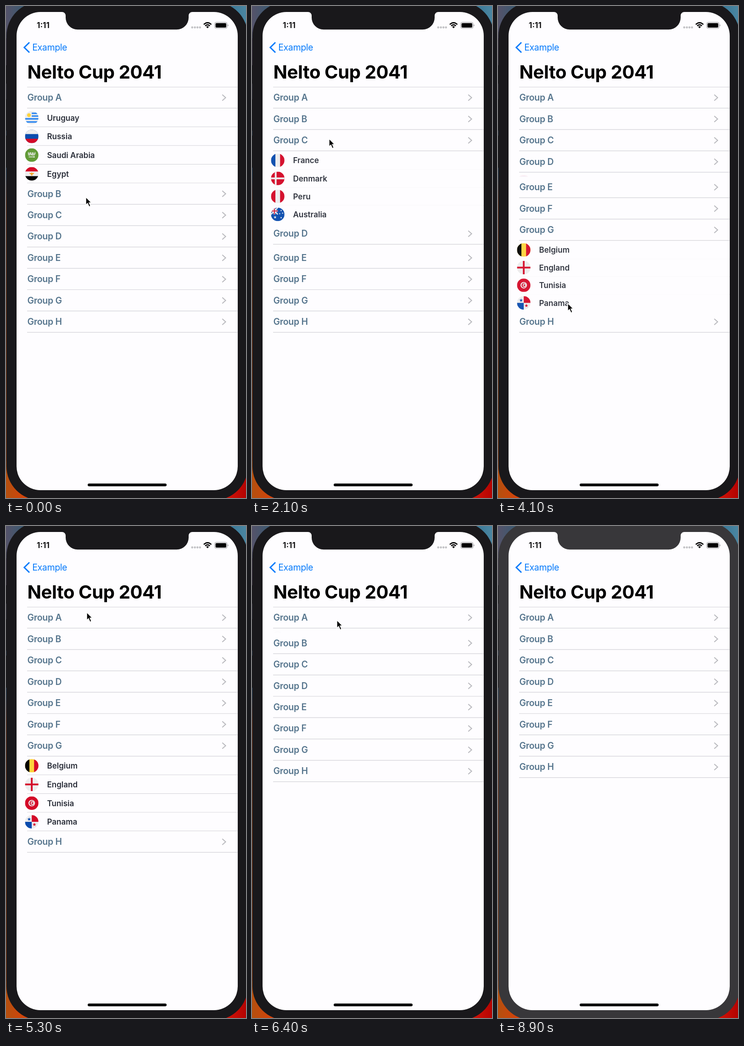
An HTML page that plays this animation: 523 by 1071 pixels, repeating every 9 s.

```html
<!DOCTYPE html>
<html lang="en">
<head>
<meta charset="utf-8">
<title>Group list</title>
<style>
  html, body { margin: 0; width: 100%; height: 100%; overflow: hidden; background: #19181b; }
  #stage { display: block; width: 100vw; height: 100vh; }
  text { font-family: Inter, "Liberation Sans", sans-serif; }
  .title { font-size: 40px; font-weight: 700; letter-spacing: -.4px; }
  .back { font-size: 19.6px; letter-spacing: -.45px; fill: #087bfb; }
  .clock { font-size: 17.5px; font-weight: 600; }
  .group { font-size: 19.4px; font-weight: 600; letter-spacing: -.25px; fill: #56758d; }
  .team { font-size: 17px; font-weight: 600; fill: #292d38; }
  .rule { stroke: #d2d2d7; stroke-width: 1.2; }
  .chevron { fill: none; stroke: #b9b9be; stroke-width: 2; }
</style>
</head>
<body>
<svg id="stage" viewBox="0 0 523 1071" preserveAspectRatio="none">
  <defs>
    <linearGradient id="wall" x2="0" y2="1">
      <stop offset="0" stop-color="#4f5266"/>
      <stop offset=".1" stop-color="#453a4c"/>
      <stop offset=".2" stop-color="#292a33"/>
      <stop offset=".34" stop-color="#2d4a66"/>
      <stop offset=".4" stop-color="#7a3b1e"/>
      <stop offset="1" stop-color="#a8480f"/>
    </linearGradient>
    <linearGradient id="topLeft">
      <stop offset="0" stop-color="#55536a"/><stop offset="1" stop-color="#2c5c73"/>
    </linearGradient>
    <linearGradient id="topRight">
      <stop offset="0" stop-color="#2f6c8c"/><stop offset="1" stop-color="#4a86a2"/>
    </linearGradient>
    <linearGradient id="bottomLeft">
      <stop offset="0" stop-color="#b4500f"/><stop offset="1" stop-color="#e23c08"/>
    </linearGradient>
    <linearGradient id="bottomRight">
      <stop offset="0" stop-color="#dc1a0a"/><stop offset="1" stop-color="#b40402"/>
    </linearGradient>
    <clipPath id="disc"><circle cx="256" cy="256" r="256"/></clipPath>
  </defs>

  <rect width="262" height="1071" fill="url(#wall)"/>
  <rect width="60" height="70" fill="url(#topLeft)"/>
  <rect x="463" width="60" height="70" fill="url(#topRight)"/>
  <rect y="991" width="60" height="80" fill="url(#bottomLeft)"/>
  <rect x="463" y="991" width="60" height="80" fill="url(#bottomRight)"/>
  <path d="M0 129h3v40H0zM0 203h3v68H0zM0 282h3v70H0z" fill="#18171a"/>
  <rect id="bezel" x="1" y="-9" width="526" height="1085" rx="74"/>
  <path fill="#fefdff" d="M75 13H122A8 8 0 0 1 130 21V25A26 26 0 0 0 156 51.3H372A26 26 0 0 0 398 25V21A8 8 0 0 1 406 13H453
    A52 52 0 0 1 505 65V1002A52 52 0 0 1 453 1054H75A52 52 0 0 1 23 1002V65A52 52 0 0 1 75 13Z"/>

  <text class="clock" x="67" y="48.3">1:11</text>
  <g fill="#c2c2c5">
    <circle cx="405.8" cy="46.6" r="2.3"/><circle cx="411.6" cy="46.6" r="2.3"/>
    <circle cx="417.2" cy="46.6" r="2.3"/><circle cx="422.7" cy="46.6" r="2.3"/>
  </g>
  <g fill="none" stroke="#000" stroke-width="2.6">
    <path d="M431 40.2Q439.2 32.4 447.4 40.2M434 43.4Q439.2 38.5 444.4 43.4"/>
  </g>
  <path d="M436.2 45.3Q439.2 42.8 442.2 45.3L439.2 48.4Z"/>
  <rect x="454.5" y="35.3" width="27.6" height="13.6" rx="4" fill="none" stroke="#9b9b9e"/>
  <rect x="456.5" y="37.2" width="23.6" height="9.8" rx="2.2"/>
  <path d="M483.3 39.7Q486 42 483.3 44.5Z" fill="#8a8a8d"/>

  <path d="M51 79.3L39.8 90.2L51 101.2" fill="none" stroke="#087bfb" stroke-width="3"/>
  <text class="back" x="57.3" y="97.2">Example</text>
  <text class="title" x="46.5" y="158">Nelto Cup 2041</text>
  <path class="rule" d="M46 176.5H504.5"/>
  <g id="list"></g>
  <rect x="178" y="1039.4" width="172" height="6" rx="3"/>
  <path id="cursor" d="M0 0V17L3.9 13.4L7 20.8L10.2 19.4L7.1 12.2H12.2Z" stroke="#fff" stroke-width="1.4"/>
</svg>
<script>
const LOOP = 9000, STEP = 100, SLIDE = 300;
const TOP = 176.5, HEAD = 46.45, ROW = 40.7;
const PAPER = '#fefdff', WHITE = '#ededee', RED = '#d40a28', BLUE = '#0b4cae', SKY = '#338af0',
      GOLD = '#ffd43c', GREEN = '#629b37';

// Flags are drawn in a 512 unit square and cut to a disc.
const box = (color, x, y, w, h) => `<rect x="${x}" y="${y}" width="${w}" height="${h}" fill="${color}"/>`;
const dot = (color, x, y, r) => `<circle cx="${x}" cy="${y}" r="${r}" fill="${color}"/>`;
const field = color => box(color, 0, 0, 512, 512);
const bands = (a, b, c) => field(b) + box(a, 0, 0, 512, 167) + box(c, 0, 345, 512, 167);
const pales = (a, b, c) => field(b) + box(a, 0, 0, 167, 512) + box(c, 345, 0, 167, 512);
const cross = (color, x, width) =>
  box(color, x - width / 2, 0, width, 512) + box(color, 0, 256 - width / 2, 512, width);
const stroke = (color, width, d) => `<path d="${d}" fill="none" stroke="${color}" stroke-width="${width}"/>`;

function star(color, x, y, r) {
  const points = Array.from({ length: 10 }, (_, i) => {
    const a = i * Math.PI / 5, d = i % 2 ? r * .4 : r;
    return [x + d * Math.sin(a), y - d * Math.cos(a)].map(Math.round);
  });
  return `<polygon points="${points.join(' ')}" fill="${color}"/>`;
}

function checker() {
  let out = box(WHITE, 156, 130, 200, 225);
  for (let i = 0; i < 25; i += 2) {
    out += box(RED, 156 + i % 5 * 40, 130 + Math.floor(i / 5) * 45, 40, 45);
  }
  return out;
}

const teams = {
  A: [
    ['Uruguay', field(WHITE) + box(SKY, 256, 62, 256, 56) + box(SKY, 256, 166, 256, 56) +
      box(SKY, 0, 270, 512, 60) + box(SKY, 0, 388, 512, 60) + dot(GOLD, 150, 160, 72)],
    ['Russia', bands(WHITE, BLUE, RED)],
    ['Saudi Arabia', field(GREEN) + stroke(WHITE, 26,
      'M130 145V215H185V150M220 145V225H275V155M310 145V215H380V140M120 255H210M240 255H370M140 325H375M340 300V350')],
    ['Egypt', bands(RED, WHITE, '#000') +
      '<path d="M160 220L235 230L256 195L277 230L352 220L320 270L275 275L290 315H222L237 275L192 270Z" fill="#f3a01c"/>']
  ],
  C: [
    ['France', pales(BLUE, WHITE, RED)],
    ['Denmark', field(RED) + cross(WHITE, 178, 68)],
    ['Peru', pales(RED, WHITE, RED)],
    ['Australia', field(BLUE) + stroke(WHITE, 44, 'M0 0L256 256M0 256L256 0') +
      box(WHITE, 95, 0, 66, 256) + box(WHITE, 0, 95, 256, 66) +
      box(RED, 112, 0, 32, 256) + box(RED, 0, 112, 256, 32) +
      star(WHITE, 155, 365, 60) + star(WHITE, 385, 110, 36) +
      star(WHITE, 330, 230, 36) + star(WHITE, 440, 210, 36) + star(WHITE, 385, 380, 40)]
  ],
  D: [
    ['Croatia', bands(RED, WHITE, BLUE) + checker()],
    ['Argentina', bands(SKY, WHITE, SKY) + dot(GOLD, 256, 256, 70)],
    ['Nigeria', pales(GREEN, WHITE, GREEN)],
    ['Iceland', field(BLUE) + cross(WHITE, 178, 120) + cross(RED, 178, 58)]
  ],
  G: [
    ['Belgium', pales('#000', GOLD, RED)],
    ['England', field(WHITE) + cross(RED, 256, 66)],
    ['Tunisia', field(RED) + dot(WHITE, 256, 256, 124) + dot(RED, 264, 256, 91) +
      dot(WHITE, 286, 256, 70) + star(RED, 280, 256, 58)],
    ['Panama', field(WHITE) + box(RED, 256, 0, 256, 256) + box(BLUE, 0, 256, 256, 256) +
      star(BLUE, 156, 160, 72) + star(RED, 356, 360, 72)]
  ]
};

// [time, section opened]; the section open before it closes.
const taps = [[-SLIDE, 'A'], [850, 'D'], [1900, 'C'], [3038, 'D'], [3915, 'G'], [5400, 'A'], [6214, '']];

// [time, x, y] of the pointer tip
const pointer = [
  [0, 174, 416], [200, 174, 416], [700, 168, 498], [950, 168, 498], [1300, 164, 427],
  [1750, 168, 289], [2250, 168, 289], [2850, 167, 491], [3300, 167, 491], [3750, 152, 647],
  [4250, 152, 647], [5000, 174, 245], [5300, 176, 188], [5600, 181, 200], [6100, 185, 205],
  [6450, 185, 205], [6950, 300, -30], [LOOP, 300, -30]
];

const list = document.getElementById('list');
const cursor = document.getElementById('cursor');
const bezel = document.getElementById('bezel');

// Rows are opaque cards, so a later one veils the row it slides over.
const teamMarkup = ([name, flag]) => `<g>
  ${box(PAPER, 24, 0, 480, ROW)}
  <g transform="translate(41.4 5.5) scale(${29.4 / 512})"><g clip-path="url(#disc)">${flag}</g></g>
  <text class="team" x="89.5" y="26.6">${name}</text>
  <path class="rule" d="M46 ${ROW - .5}H504.5"/></g>`;

const sections = [...'ABCDEFGH'].map(key => {
  const rows = teams[key] || [];
  list.insertAdjacentHTML('beforeend', `<g>
    <text class="group" x="46.5" y="29.8">Group ${key}</text>
    <path class="chevron" d="M471.3 16.6L478.6 23.1L471.3 29.6"/>
    <path class="rule" d="M46 ${HEAD - .5}H504.5"/>
    <svg y="${HEAD}" width="523" height="0">${rows.map(teamMarkup).join('')}</svg></g>`);
  const node = list.lastElementChild;
  const body = node.querySelector('svg');
  return { key, node, body, rows: [...body.children] };
});

const easeOut = u => 1 - (1 - u) ** 3;
const smooth = u => u * u * (3 - 2 * u);

function openness(key, t) {
  const last = taps.findLastIndex(tap => tap[0] <= t);
  const p = easeOut(Math.min(1, (t - taps[last][0]) / SLIDE));
  if (taps[last][1] === key) return p;
  return last && taps[last - 1][1] === key ? 1 - p : 0;
}

function pointerAt(t) {
  const i = pointer.findIndex(stop => stop[0] > t);
  const [t0, x0, y0] = pointer[i - 1], [t1, x1, y1] = pointer[i];
  const u = smooth((t - t0) / (t1 - t0));
  return [x0 + (x1 - x0) * u, y0 + (y1 - y0) * u];
}

function draw(t) {
  let y = TOP;
  for (const { key, node, body, rows } of sections) {
    const open = openness(key, t);
    const height = open * ROW * rows.length;
    node.setAttribute('transform', `translate(0 ${y})`);
    body.setAttribute('height', height);
    body.style.display = height > 0 ? '' : 'none';
    rows.forEach((row, i) => {
      row.setAttribute('transform', `translate(0 ${i * ROW * open})`);
      row.setAttribute('opacity', open);
    });
    y += HEAD + height;
  }
  cursor.setAttribute('transform', `translate(${pointerAt(t)})`);
  bezel.setAttribute('fill', t < 7400 ? '#19181b' : '#38373a');
}

function tick() {
  const t = (performance.now() + 1) % LOOP;
  draw(Math.floor(t / STEP) * STEP);
  requestAnimationFrame(tick);
}
tick();
</script>
</body>
</html>
```
